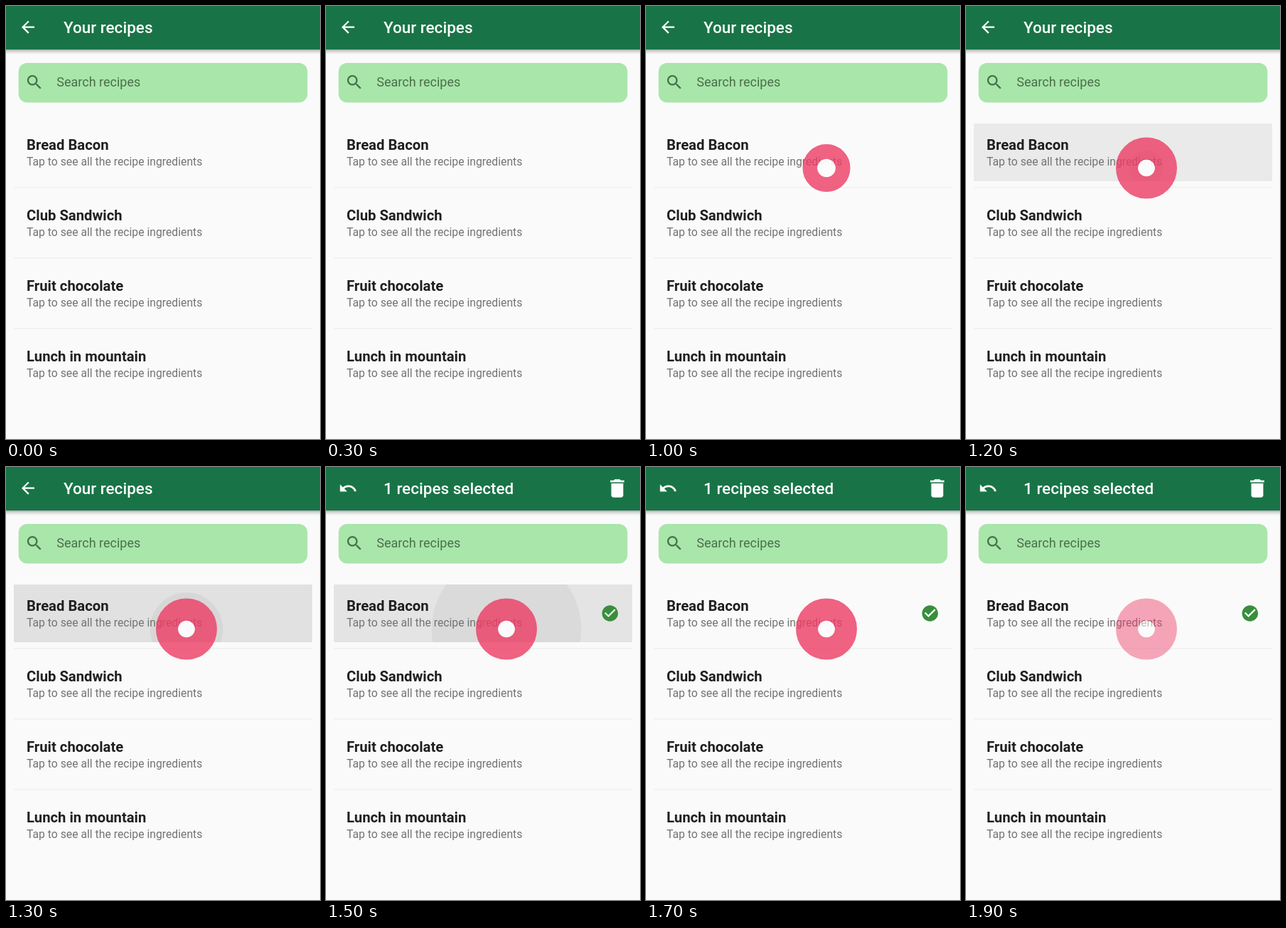
An HTML page for the animation above (2 s loop, 442 by 608 pixels).

```html
<!DOCTYPE html>
<html lang="en">
<head>
<meta charset="utf-8">
<title>Your recipes</title>
<style>
  html, body { margin: 0; width: 100%; height: 100%; overflow: hidden; background: #fafafa; }
  svg { display: block; width: 100%; height: 100%; font-family: Roboto, Arial, sans-serif; }
  .bar { font-size: 22.5px; font-weight: 500; fill: #fff; }
  .hint { font-size: 18px; fill: #4a704b; }
  .name { font-size: 20.26px; font-weight: 700; fill: #1f1f1f; }
  .note { font-size: 15.76px; fill: #737373; }
</style>
</head>
<body>
<svg viewBox="0 0 442 608">
  <defs>
    <linearGradient id="shade" x1="0" y1="0" x2="0" y2="1">
      <stop offset="0" stop-color="#000" stop-opacity=".34"/>
      <stop offset=".4" stop-color="#000" stop-opacity=".13"/>
      <stop offset="1" stop-color="#000" stop-opacity="0"/>
    </linearGradient>
    <clipPath id="rowClip"><rect x="11" y="165" width="420" height="81"/></clipPath>
  </defs>
  <rect width="442" height="608" fill="#fafafa"/>
  <rect y="61" width="442" height="7" fill="url(#shade)"/>
  <rect width="442" height="61" fill="#187446"/>

  <g id="browseBar" fill="#fff">
    <path transform="translate(17.5 16.2) scale(1.1255)" d="M20 11H7.83l5.59-5.59L12 4l-8 8 8 8 1.41-1.41L7.83 13H20v-2z"/>
    <text class="bar" x="81" y="38.2">Your recipes</text>
  </g>
  <g id="selectBar" fill="#fff">
    <path transform="translate(17.5 16.5) scale(1.1255)" d="M12.5 8c-2.65 0-5.05.99-6.9 2.6L2 7v9h9l-3.62-3.62c1.39-1.16 3.16-1.88 5.12-1.88 3.54 0 6.55 2.31 7.6 5.5l2.37-.78C21.08 11.03 17.15 8 12.5 8z"/>
    <text class="bar" x="81" y="38.2">1 recipes selected</text>
    <path transform="translate(393.1 13.1) scale(1.407)" d="M6 19c0 1.1.9 2 2 2h8c1.1 0 2-.9 2-2V7H6v12zM19 4h-3.5l-1-1h-5l-1 1H5v2h14V4z"/>
  </g>

  <rect x="17.7" y="80" width="406.6" height="55.5" rx="12" fill="#a8e6a9"/>
  <path transform="translate(26.5 93.5) scale(1.1255)" fill="#43704a" d="M15.5 14h-.79l-.28-.27C15.41 12.59 16 11.11 16 9.5 16 5.91 13.09 3 9.5 3S3 5.91 3 9.5 5.91 16 9.5 16c1.61 0 3.09-.59 4.23-1.57l.27.28v.79l5 4.99L20.49 19l-4.99-5zm-6 0C7.01 14 5 11.99 5 9.5S7.01 5 9.5 5 14 7.01 14 9.5 11.99 14 9.5 14z"/>
  <text class="hint" x="71.3" y="113.2">Search recipes</text>

  <g id="press" clip-path="url(#rowClip)">
    <rect id="highlight" x="11" y="165" width="420" height="81" fill="#bcbcbc"/>
    <circle id="splash" cx="254" cy="227.5" fill="#c8c8c8"/>
  </g>
  <g id="rows"></g>
  <path id="check" transform="translate(386.3 191.9) scale(1.1255)" fill="#388e3c" d="M12 2C6.48 2 2 6.48 2 12s4.48 10 10 10 10-4.48 10-10S17.52 2 12 2zm-2 15l-5-5 1.41-1.41L10 14.17l7.59-7.59L19 8l-9 9z"/>

  <g id="touch">
    <circle id="ring" cx="254" cy="227.5" fill="none" stroke="#ed3c65" stroke-opacity=".8"/>
    <circle id="dot" cx="254" cy="227.5" fill="#fcfcfc" fill-opacity=".96"/>
  </g>
</svg>
<script>
  const LOOP = 2000, STEP = 100;
  const $ = id => document.getElementById(id);
  const clamp = v => Math.min(1, Math.max(0, v));
  const set = (id, attrs) => {
    for (const key in attrs) $(id).setAttribute(key, attrs[key]);
  };
  const show = (id, on) => set(id, { visibility: on ? "visible" : "hidden" });

  const recipes = ["Bread Bacon", "Club Sandwich", "Fruit chocolate", "Lunch in mountain"];
  $("rows").innerHTML = recipes.map((name, i) => `
    <g transform="translate(0 ${i * 99})">
      <text class="name" x="29" y="201.6">${name}</text>
      <text class="note" x="29" y="223.6">Tap to see all the recipe ingredients</text>
      ${i < recipes.length - 1 ? '<rect x="11" y="254.3" width="420" height="1.1" fill="#ededed"/>' : ""}
    </g>`).join("");

  function draw(t) {
    const selected = t >= 1500;
    show("browseBar", !selected);
    show("selectBar", selected);
    show("check", selected);

    // Row highlight and ripple fade together once the long press is accepted
    const fadeOut = 1 - clamp((t - 1479) / 189);
    set("highlight", { "fill-opacity": 0.4 * clamp((t - 1100) / 145) * fadeOut });
    set("splash", {
      r: Math.max(0, (t - 1110) * 0.27),
      "fill-opacity": 0.4 * fadeOut
    });

    // Finger marker grows on contact and fades on release
    const p = clamp((t - 950) / 150);
    const outer = 43 * (1 - Math.pow(1 - p, 3.73));
    const inner = 11.5 + 1.5 * (1 - p);
    show("touch", p > 0);
    set("touch", { opacity: t >= 1900 ? 0.56 : 1 });
    set("ring", {
      r: (outer + inner) / 2,
      "stroke-width": Math.max(0, outer - inner)
    });
    set("dot", { r: inner + 0.3 });
  }

  const start = performance.now();
  function tick() {
    const t = (performance.now() - start) % LOOP;
    draw(Math.floor(t / STEP) * STEP);
    requestAnimationFrame(tick);
  }
  tick();
</script>
</body>
</html>
```
